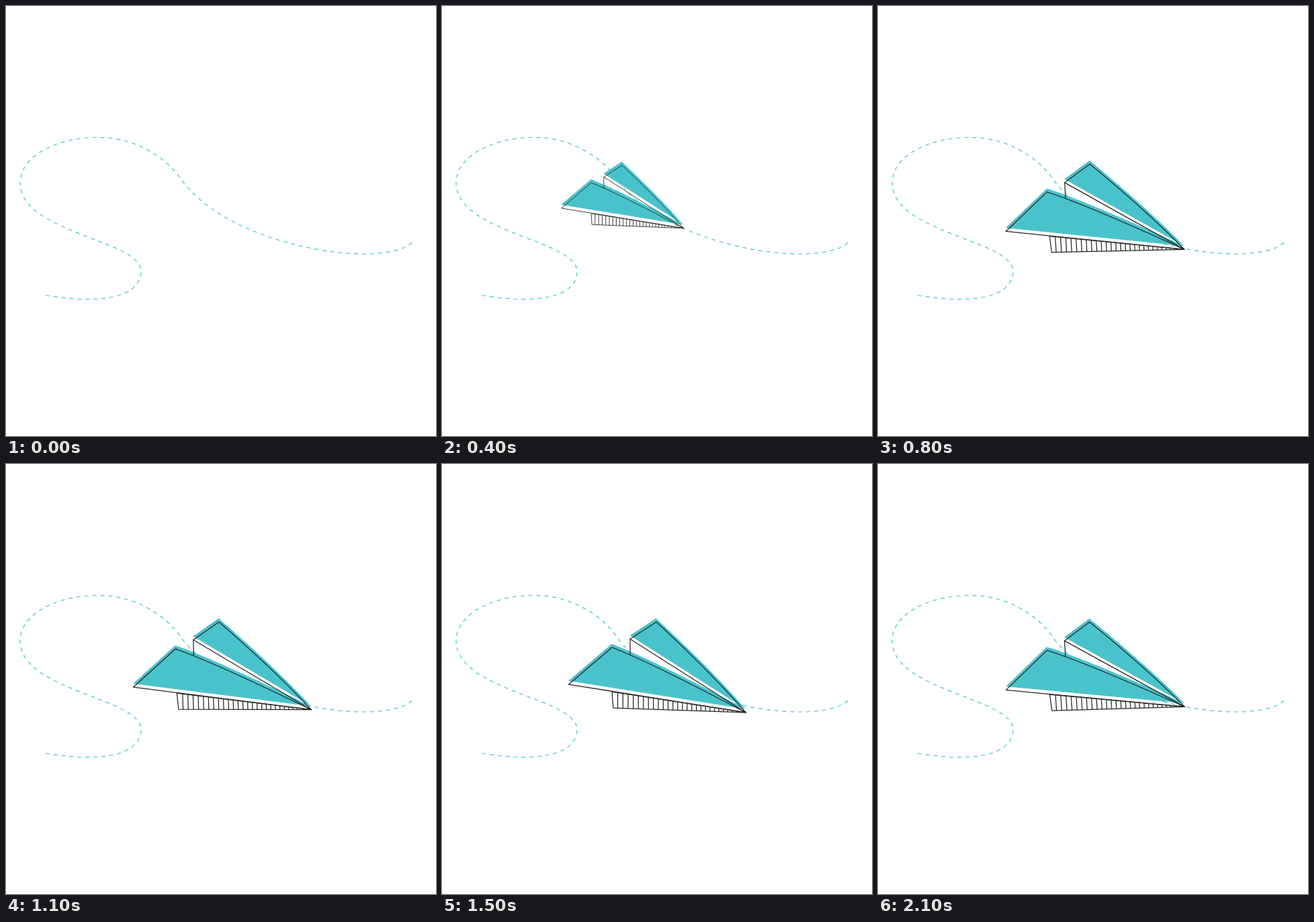
Write an HTML page that moves like this. It is 640 by 640 pixels and loops after 2200 ms.

```html
<!DOCTYPE html>
<html lang="en">
<head>
<meta charset="utf-8">
<title>Paper plane</title>
<style>
  html, body { margin: 0; width: 100%; height: 100%; overflow: hidden; background: #fff; }
  svg { display: block; width: 100vw; height: 100vh; }
  .ink { fill: none; stroke: #252425; stroke-width: 1.25; stroke-linejoin: round; }
  #tint { fill: #49c3cb; }
  #trail { fill: none; stroke: #49c3cb; stroke-width: 1.2; stroke-dasharray: 6 6; }
</style>
</head>
<body>
<svg viewBox="0 0 640 640">
  <defs>
    <!-- coordinates are relative to the plane's pivot -->
    <g id="wings">
      <path d="M-131.5 28 L-67 -27 Q-12 -6 132.3 70 Z"/>
      <path d="M-40 -39.5 L-1 -65 Q80 10 132.3 70 Z"/>
    </g>
  </defs>
  <path id="trail" d="M59 430.5 C150 446 201 430 201 395 C201 348 21 338 21 263
    C21 224 75 195.5 137 195.5 C188 195.5 234 221 259 256
    C316 336 455 369 532 369 C565 369 594 363 604 352"/>
  <g id="plane">
    <g id="tint"><use href="#wings"/></g>
    <g id="lines" class="ink">
      <use href="#wings"/>
      <path d="M-40 -39.5 V-15.5 M-67 39 L-65.2 63 L132.3 70 Z"/>
      <path id="hatch"/>
    </g>
  </g>
</svg>
<script>
const get = id => document.getElementById(id);
const plane = get('plane'), tint = get('tint'), lines = get('lines'), trail = get('trail');
const LOOP = 2200, STEP = 100, REST_ANGLE = 9.04;
const clamp = v => Math.max(0, Math.min(1, v));

// Fit whole dashes so that the trail begins and ends with one.
const DASHES = 90;
trail.setAttribute('pathLength', DASHES * 12 - 6);

// Hatching between the two edges of the keel.
let hatch = '';
for (let i = 0; i < 25; i++) {
  const x = -58.5 + 7.8 * i - 0.03 * i * i, k = (x + 67) / 199.3;
  hatch += `M${x} ${39 + 31 * k}V${63 + 7 * (x + 65.2) / 197.5}`;
}
get('hatch').setAttribute('d', hatch);

function draw(t) {
  plane.style.display = t < 200 ? 'none' : '';
  const away = 51.6 * Math.max(0, (733 - t) / 333) ** 3;
  const scale = Math.min(1, 1 - 0.00103 * (700 - t));
  const swing = 7.2 + 1.88 * Math.cos(2 * Math.PI * (t - 1450) / 1400);
  const p = clamp((t - 600) / 250), mix = p * p * (3 - 2 * p);
  const angle = 9.3 + (swing - 9.3) * mix - REST_ANGLE;
  const pose = `rotate(${angle}) scale(${scale})`;
  plane.setAttribute('transform', `translate(${320 - away} ${300 - 0.349 * away})`);
  lines.setAttribute('transform', pose);
  tint.setAttribute('transform', `translate(-0.4 -5.2) ${pose}`);
}

const start = performance.now();
function tick() {
  const t = (performance.now() - start) % LOOP;
  draw(Math.floor(t / STEP) * STEP);
  requestAnimationFrame(tick);
}
tick();
</script>
</body>
</html>
```
